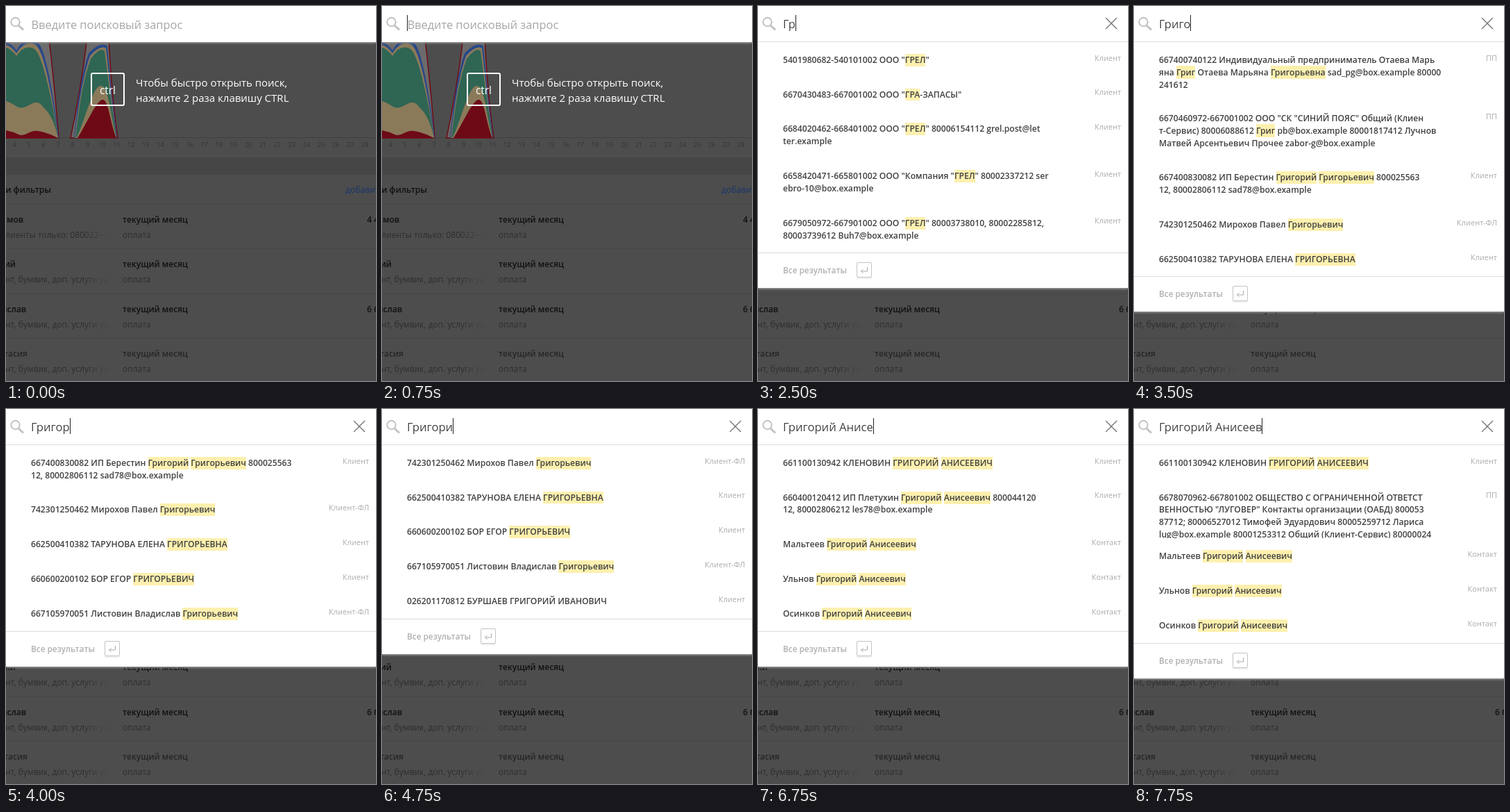
These frames come from a looping animation (533x540 px, 8 s). An HTML page:

```html
<!DOCTYPE html>
<html lang="ru">
<head>
<meta charset="utf-8">
<title>Быстрый поиск</title>
<style>
html, body { margin: 0; width: 100%; height: 100%; overflow: hidden; }
body { position: relative; background: #4d4d4d; font: 12.15px "Open Sans", "Noto Sans", sans-serif; }
svg { position: absolute; left: 0; top: 0; overflow: visible; }
.label { position: absolute; line-height: 20px; white-space: pre; }
.strong { font-weight: 600; font-size: 12px; color: #101010; }
.faded { font-size: 12px; color: #2e2e2e; }
.day { width: 30px; text-align: center; font-size: 9px; color: #353535; }
.line { position: absolute; left: 0; width: 100%; height: 1px; background: #464646; }
.fade { position: absolute; left: 112px; width: 44px; height: 20px; background: linear-gradient(90deg, #4d4d4d00, #4d4d4d 90%); }
.hint { font-size: 15px; color: #fff; }
#key { position: absolute; left: 122px; top: 96px; width: 45px; height: 44px; border: 2px solid #fff; border-radius: 3px;
  font-size: 15.5px; line-height: 46px; text-align: center; color: #fff; }
#panel { position: absolute; left: 0; top: 0; width: 100%; background: #fff; box-shadow: 0 2px 2px #8a8a8a; }
#bar { height: 51px; }
#query { position: absolute; left: 36px; top: 13px; height: 24px; line-height: 25px; font-size: 16.6px; white-space: pre; color: #444; }
#placeholder { position: absolute; left: 36.5px; top: 15px; line-height: 24px; font-size: 16.4px; color: #a6a6a6; }
#caret { position: absolute; left: 100%; top: 0; width: 1px; height: 23px; background: #222; }
#results { border-top: 1px solid #dcdcdc; padding-top: .5px; }
.row { position: relative; box-sizing: border-box; padding: 16.2px 0 0 36px; }
.text { max-height: 67px; overflow: hidden; line-height: 17.9px; font-weight: 600; white-space: pre; color: #404040; }
mark { background: #fdf0ae; color: inherit; padding: 1px 0; }
.tag { position: absolute; right: 10px; top: 12px; line-height: 20px; font-size: 11px; color: #acacac; }
#footer { position: relative; height: 50px; border-top: 1px solid #dcdcdc; }
#footer b { position: absolute; left: 36px; top: 14px; line-height: 20px; font-size: 11.8px; font-weight: 600; color: #b0b0b0; }
</style>
</head>
<body>
<svg id="chart" width="533" height="245"></svg>
<div id="page"></div>
<div id="key">ctrl</div>
<div id="panel">
  <div id="bar">
    <svg width="533" height="52" fill="none">
      <g stroke="#c2c2c2"><circle cx="13.5" cy="23" r="6.2" stroke-width="2"/><path d="M18 28l7 6.5" stroke-width="3"/></g>
      <path id="close" d="M501 17l16 16m0-16l-16 16" stroke="#777" stroke-width="1.4"/>
    </svg>
    <div id="placeholder">Введите поисковый запрос</div>
    <div id="query"><span id="typed"></span><i id="caret"></i></div>
  </div>
  <div id="results">
    <div id="rows"></div>
    <div id="footer"><b>Все результаты</b>
      <svg width="180" height="50" fill="none" stroke="#c4c4c4">
        <rect x="142.500" y="13.500" width="21" height="21" rx="1.500"/><path d="M142 36h22" stroke="#ddd"/>
        <path d="M157.500 20v6h-9m3-3l-3 3 3 3" stroke="#aaa"/>
      </svg>
    </div>
  </div>
</div>
<script>
const $ = id => document.getElementById(id);
const page = $('page');

function label(x, y, text, type, color = '') {
  page.insertAdjacentHTML('beforeend',
    `<div class="label ${type}" style="left:${x}px;top:${y - 10}px;color:${color}">${text}</div>`);
}
// Label that ends at x.
function labelEnd(x, y, text, type, color = '') {
  page.insertAdjacentHTML('beforeend',
    `<div class="label ${type}" style="right:calc(100% - ${x}px);top:${y - 10}px;color:${color}">${text}</div>`);
}
const line = y => page.insertAdjacentHTML('beforeend', `<div class="line" style="top:${y}px"></div>`);

function drawChart() {
  const area = (d, fill, stroke = 'none') => `<path d="${d}" fill="${fill}" stroke="${stroke}" stroke-width="1.500"/>`;
  $('chart').innerHTML = '<path d="M0 218H533V243H0z" fill="#464646"/><path d="M0 189.500H533" stroke="#404040"/>' +
    area('M0 190V40H61Q68 95 76 190z', '#6c6c6c', '#6e0a16') +
    area('M0 190V52Q8 54 15 64Q27 42 45 52Q60 62 76 190z', '#27488a') +
    area('M0 190V56Q8 58 15 68Q27 48 43 56Q58 68 75 190z', '#8a7a5a') +
    area('M0 190V60Q8 62 15 72Q27 54 41 62Q56 74 75 190z', '#2f6553') +
    area('M0 190V137C12 140 16 149 26 146S44 132 54 146Q68 158 75 190z', '#8a7a5a') +
    area('M0 190V179Q10 181 18 185C28 189 34 178 46 180S66 186 75 190z', '#6e0a16') +
    area('M93 190Q108 120 117 45H148Q152 130 161 190z', '#686868', '#6e0a16') +
    area('M98 190Q106 105 119 68Q137 50 146 58Q151 120 160 190z', '#27488a') +
    area('M99 190Q108 108 121 72Q136 55 144 61Q150 120 159 190z', '#8a7a5a') +
    area('M100 190Q109 110 122 76Q136 58 142 65Q149 120 159 190z', '#2f6553') +
    area('M101 190C112 172 124 116 136 115S150 155 159 190z', '#8a7a5a') +
    area('M103 190C116 170 130 136 139 135S150 170 159 190z', '#6e0a16');
}

function drawPage() {
  for (let day = 4; day <= 28; day++) label(-3 + 21.05 * (day - 4), 200, day, 'day');
  line(218);
  labelEnd(65, 265, 'Мои фильтры', 'strong');
  label(489, 265, 'добавить', '', '#17356c');
  const service = 'нт, бумвик, доп. услуги уц';
  [['имов', 25, '4 460', 'клиенты только: 080022—о'], ['ий', 14, '', service],
   ['ислав', 29, '6 680', service], ['тасия', 31, '', service]].forEach(([name, end, sum, note], i) => {
    const y = 308 + 64.4 * i, color = i == 3 ? '#262626' : '';
    line(y - 23);
    labelEnd(end, y, name, 'strong', color);
    label(168, y, 'текущий месяц', 'strong', color);
    label(520, y, sum, 'strong');
    label(i ? -1 : -7, y + 22, note, 'faded');
    label(112, y + 22, '', 'fade');
    label(168, y + 22, 'оплата', 'faded');
  });
  label(187, 110, 'Чтобы быстро открыть поиск,', 'hint');
  label(187, 132, 'нажмите 2 раза клавишу CTRL', 'hint');
}

// Rows are "tag#line|line"; square brackets mark the matches.
const letterG = [
  'Клиент#6686010423-668601002 Детская Спортивная организация Круж|ок Любителей Игры Настольной "Площадь Спящего [Города]"|[г]. Екатеринбург 80000336812 klavdia-luga@post.example',
  'Клиент#6658990153-668601002 ДЕТСКАЯ МУЗЫКАЛЬНАЯ ОРГАНИЗАЦИ|Я ВЕЧЕРНИЙ ХОРОВОЙ КОЛЛЕКТИВ ПРЕПОДАВАТЕЛЕЙ ТР|УБЫ, БАРАБАНОВ, ФАГОТОВ И ВСЕЙ МЕДИ [Г]. ЕКАТЕРИНБУРГ|ЕКАТЕРИНБУРГСКОЙ ОКРУГИ СОЮЗА ЛЮБИТЕЛЕЙ МУЗЫКИ',
  'Клиент#6685990664-668501002 Детская самодеятельная творческая орга|низация Театр Кукольно-Теневого музыкального сюжета [г]. Ека|теринбурга Свердловской области Восточноуральской секции|Любителей Сценического Слова (Вечернее Отделение) 80002',
  'Клиент#7719061340-100102001 Северный институт (филиал) федерально|го [государственного] бюджетного образовательного учрежден|ия высшего образования «Всероссийский [государственный] ун|иверситет юстиции (РПА Минюста России)» в [г]. Петрозаводске',
  'Клиент#6668020421-666801002 Детская спортивная организация круж|ок начинающих лыжников "Вечерняя Полянка" [г]. Нижнего Тагил|а',
];
const companies = [
  'Клиент#5401980682-540101002 ООО "[ГРЕЛ]"',
  'Клиент#6670430483-667001002 ООО "[ГРА]-ЗАПАСЫ"',
  'Клиент#6684020462-668401002 ООО "[ГРЕЛ]" 80006154112 grel.post@let|ter.example',
  'Клиент#6658420471-665801002 ООО "Компания "[ГРЕЛ]" 80002337212 ser|ebro-10@box.example',
  'Клиент#6679050972-667901002 ООО "[ГРЕЛ]" 80003738010, 80002285812,|80003739612 Buh7@box.example',
];
const maryana = 'ПП#667400740122 Индивидуальный предприниматель Отаева Марь|яна [Григ] Отаева Марьяна [Григорьевна] sad_pg@box.example 80000|241612';
const belt = 'ПП#6670460972-667001002 ООО "СК "СИНИЙ ПОЯС" Общий (Клиен|т-Сервис) 80006088612 [Григ] pb@box.example 80001817412 Лучнов|Матвей Арсентьевич Прочее zabor-g@box.example';
const berestin = 'Клиент#667400830082 ИП Берестин [Григорий] [Григорьевич] 800025563|12, 80002806112 sad78@box.example';
const mirohov = 'Клиент-ФЛ#742301250462 Мирохов Павел [Григорьевич]';
const tarunova = 'Клиент#662500410382 ТАРУНОВА ЕЛЕНА [ГРИГОРЬЕВНА]';
const bor = 'Клиент#660600200102 БОР ЕГОР [ГРИГОРЬЕВИЧ]';
const listovin = 'Клиент-ФЛ#667105970051 Листовин Владислав [Григорьевич]';
const grove = 'Клиент#660400120412 ИП Плетухин [Григорий] [Анисеевич] 800044120|12, 80002806212 les78@box.example';
const tarbosov = 'Клиент-ФЛ#753600030802 Тарбосов Григорий Вениаминович';
const klenovin = 'Клиент#661100130942 КЛЕНОВИН [ГРИГОРИЙ] [АНИСЕЕВИЧ]';
const beregin = 'Клиент#553701220212 БЕРЕГИН [ГРИГОРИЙ] [АЛЕКСАНДРОВИЧ]';
const zavetov = 'Клиент-ФЛ#666003060322 Заветов [Григорий] [Алексеевич]';
const burshaev = 'Клиент#026201170812 БУРШАЕВ ГРИГОРИЙ ИВАНОВИЧ';
const society = 'ПП#6678070962-667801002 ОБЩЕСТВО С ОГРАНИЧЕННОЙ ОТВЕТСТ|ВЕННОСТЬЮ "ЛУГОВЕР" Контакты организации (ОАБД) 800053|87712; 80006527012 Тимофей Эдуардович 80005259712 Лариса|lug@box.example 80001253312 Общий (Клиент-Сервис) 80000024';
const contacts = ['Мальтеев', 'Ульнов', 'Осинков'].map(name => `Контакт#${name} [Григорий] [Анисеевич]`);

// Each entry: start time in ms and the value from then on.
const name = 'Григорий Анисеев';
const typing = [[0, 0], [2000, 1], [2250, 2], [2750, 3], [3250, 4], [3500, 5], [4000, 6], [4500, 7],
  [5000, 8], [5250, 10], [5500, 11], [6000, 12], [6750, 14], [7250, 15], [7750, 16]];
const searches = [
  [0, []],
  [2000, letterG],
  [2500, companies],
  [3000, [maryana, belt, berestin, grove, mirohov]],
  [3500, [maryana, belt, berestin, mirohov, tarunova]],
  [3750, [belt, maryana, berestin, mirohov, tarunova]],
  [4000, [berestin, mirohov, tarunova, bor, listovin]],
  [4750, [mirohov, tarunova, bor, listovin, burshaev]],
  [5000, [klenovin, tarbosov, beregin, zavetov, burshaev]],
  [5250, [tarbosov, klenovin, beregin, zavetov, burshaev]],
  [5750, [klenovin, beregin, zavetov, ...contacts.slice(0, 2)]],
  [6000, [klenovin, grove, ...contacts]],
  [7000, [klenovin, society, ...contacts]],
];
const at = (steps, t) => steps.findLast(([start]) => start <= t)[1];

function rowHtml(row) {
  const [tag, text] = row.split('#');
  const lines = text.split('|');
  const height = Math.min(84.8, 32.2 + 17.7 * lines.length);
  const marked = lines.join('\n').replace(/\[(.+?)\]/g, '<mark>$1</mark>');
  return `<div class="row" style="height:${height}px"><div class="text">${marked}</div><div class="tag">${tag}</div></div>`;
}

let shown;
function render() {
  const t = performance.now() % 8000;
  const count = at(typing, t), rows = at(searches, t);
  $('typed').textContent = name.slice(0, count);
  $('caret').hidden = t < 500;
  $('caret').style.display = t < 500 ? 'none' : '';
  $('placeholder').style.display = count ? 'none' : '';
  $('close').style.display = $('results').style.display = count ? '' : 'none';
  $('bar').style.height = count ? '51px' : '52px';
  if (rows !== shown) $('rows').innerHTML = rows.map(rowHtml).join('');
  shown = rows;
  requestAnimationFrame(render);
}

drawChart();
drawPage();
render();
</script>
</body>
</html>
```
